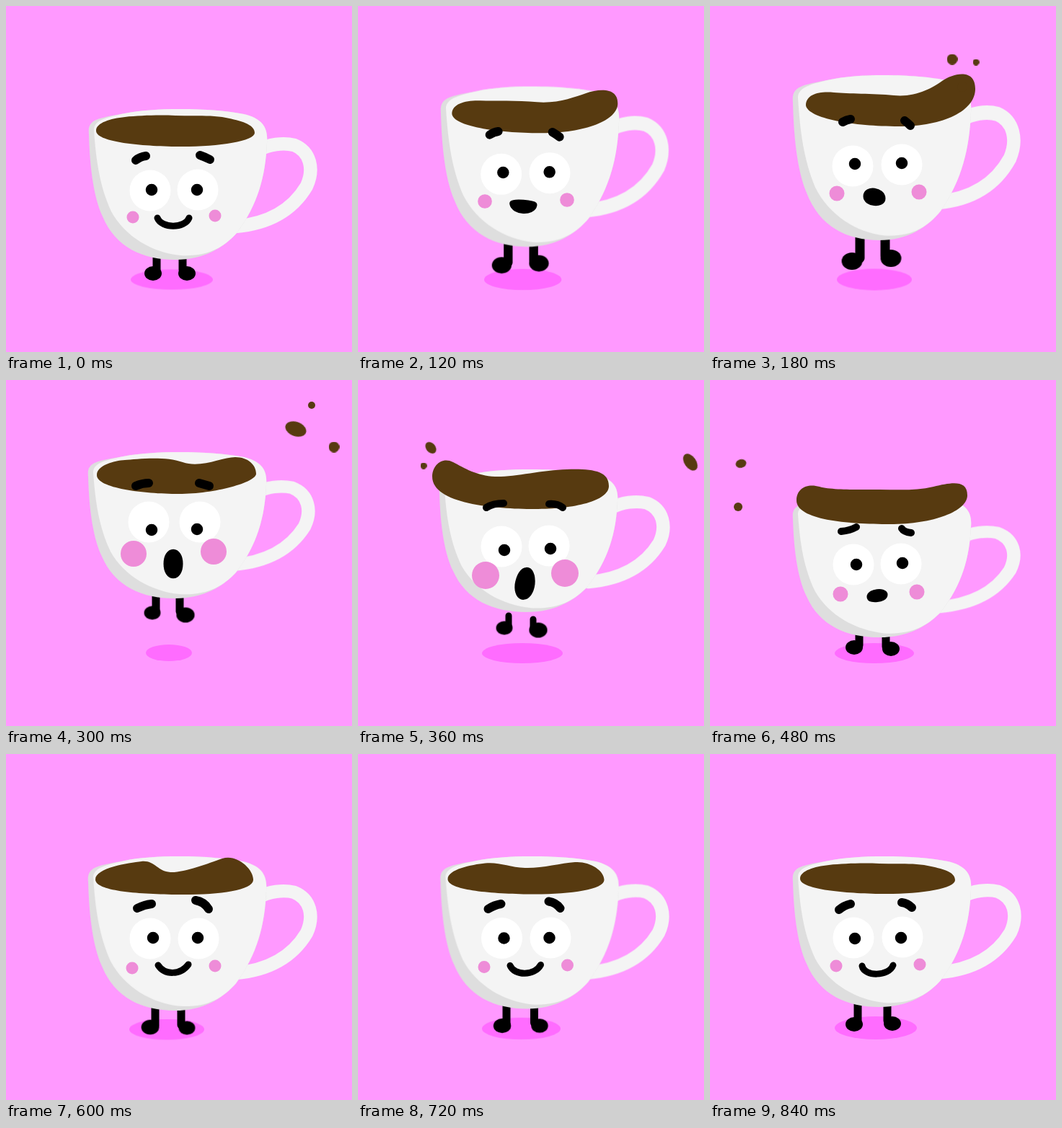
An HTML page without scripts for the animation above (900 ms loop, 480 px wide and 480 px high).

```html
<!DOCTYPE html>
<html lang="en">
<head>
<meta charset="utf-8">
<title>Jumping coffee cup</title>
<style>
html, body { margin: 0; width: 100%; height: 100%; overflow: hidden; background: #ff99ff; }
svg { display: block; width: 100vw; height: 100vh; }

/* Drawn at 15 poses per loop: each segment steps once every 60 ms. */
.morph, .move, .right, .left { animation: 900ms -1ms infinite step-end; }
.morph { animation-name: morph; }
.move { animation-name: move; }
.right { animation-name: right; }
.left { animation-name: left; }

@keyframes morph {
  0% { d: var(--rest); stroke-width: var(--w-rest, var(--w)); animation-timing-function: steps(3); }
  20% { d: var(--rise); stroke-width: var(--w-rise, var(--w)); animation-timing-function: steps(2); }
  33.33% { d: var(--apex); stroke-width: var(--w-apex, var(--w)); }
  40% { d: var(--fall); stroke-width: var(--w-fall, var(--w)); animation-timing-function: steps(2); }
  53.33% { d: var(--land); stroke-width: var(--w-land, var(--w)); animation-timing-function: steps(2); }
  66.66% { d: var(--recoil); stroke-width: var(--w-rest, var(--w)); animation-timing-function: steps(4); }
  93.33% { d: var(--settle); stroke-width: var(--w-rest, var(--w)); }
  100% { d: var(--rest); stroke-width: var(--w-rest, var(--w)); }
}
@keyframes move {
  0% { transform: var(--rest); animation-timing-function: steps(3); }
  20% { transform: var(--rise); animation-timing-function: steps(2); }
  33.33% { transform: var(--apex); }
  40% { transform: var(--fall); animation-timing-function: steps(2); }
  53.33% { transform: var(--land); animation-timing-function: steps(2); }
  66.66% { transform: var(--recoil); animation-timing-function: steps(4); }
  93.33% { transform: var(--settle); }
  100% { transform: var(--rest); }
}
@keyframes right {
  0% { opacity: 0; }
  20% { opacity: 1; transform: var(--rise); animation-timing-function: steps(2); }
  33.33% { opacity: 1; transform: var(--apex); }
  40% { opacity: var(--stay, 0); transform: var(--fall, var(--apex)); }
  46.66%, 100% { opacity: 0; }
}
@keyframes left {
  0% { opacity: 0; }
  40% { opacity: 1; transform: var(--fall); animation-timing-function: steps(2); }
  53.33% { opacity: 1; transform: var(--land); }
  60% { opacity: 1; transform: var(--gone); }
  66.66%, 100% { opacity: 0; }
}

.line { fill: none; stroke-linecap: round; stroke-linejoin: round; }
.ink { stroke: #000; }
.coffee { fill: #573a10; }

#shadow {
  --rest: translate(230px, 379.5px) scale(57, 14);
  --rise: translate(228px, 379.5px) scale(52, 15);
  --apex: translate(226px, 378.5px) scale(32, 11.5);
  --fall: translate(228px, 379px) scale(56, 14);
  --land: translate(228px, 379px) scale(55, 14);
  --recoil: translate(223px, 382px) scale(52, 14.5);
  --settle: translate(230px, 380px) scale(57, 16);
}
#handle {
  --rest: translate(0, 0) scaleY(1);
  --rise: translate(-1px, -59.2px) scaleY(1.083);
  --apex: translate(-3px, -33.3px) scaleY(.947);
  --fall: translate(1px, -16.5px) scaleY(.97);
  --land: translate(-1px, 36.5px) scaleY(.91);
  --recoil: translate(0, .4px) scaleY(.992);
  --settle: translate(0, -.6px) scaleY(.992);
}
#body {
  --rest: translate(0, 0) scaleY(1);
  --rise: translate(0, -60.8px) scaleY(1.096);
  --apex: translate(-1px, -38.8px) scaleY(.971);
  --fall: translate(-2px, -11.4px) scaleY(.947);
  --land: translate(0, 23.4px) scaleY(.948);
  --recoil: translate(-1px, -4.5px) scaleY(1.024);
  --settle: translate(0, -1px) scaleY(1);
}
#legs {
  --w-rest: 11px; --w-rise: 13px; --w-apex: 11px; --w-fall: 9px; --w-land: 11px;
  --rest: path("M209 340V368M245 340V366");
  --rise: path("M208 310V350M243 310V346");
  --apex: path("M208 290V320M241 290V321");
  --fall: path("M209 327V342M243 332V344");
  --land: path("M207 345V368M244 345V370");
  --recoil: path("M207 340V376M243 342V376");
  --settle: path("M205 340V372M246 340V370");
}
#foot-l {
  --rest: translate(204px, 371px) scale(1);
  --rise: translate(197px, 354px) scale(1.2);
  --apex: translate(203px, 323px) scale(.95);
  --fall: translate(203px, 344px) scale(.95);
  --land: translate(200px, 371px) scale(1);
  --recoil: translate(200px, 379px) scale(1.03);
  --settle: translate(200px, 375px) scale(1);
}
#foot-r {
  --rest: translate(251px, 371px) scale(1);
  --rise: translate(251px, 350px) scale(1.2);
  --apex: translate(249px, 326px) scale(1.05);
  --fall: translate(250px, 347px) scale(1.05);
  --land: translate(251px, 373px) scale(1);
  --recoil: translate(251px, 380px) scale(.95);
  --settle: translate(253px, 374px) scale(1);
}
#coffee {
  --rest: path("M125 173C125 162 145 156 165 154S210 151 235 152S285 151 305 155S345 164 345 176S290 196 235 195S125 188 125 173Z");
  --rise: path("M133 138C133 122 152 118 172 120S225 121 255 124S308 114 322 104S368 85 368 115S325 167 262 167S136 156 133 138Z");
  --apex: path("M126 132C126 118 150 112 165 111S220 105 245 114S300 107 318 107S347 118 347 130S290 158 240 158S126 150 126 132Z");
  --fall: path("M103 134C103 118 117 106 132 114S165 133 190 134S255 125 290 124S348 126 348 147S300 179 245 179S103 172 103 134Z");
  --land: path("M120 167C120 150 135 143 152 148S210 152 235 152S285 154 310 148S357 138 357 160S310 200 250 200S120 194 120 167Z");
  --recoil: path("M124 174C124 158 170 151 188 149S210 163 228 164S280 152 300 145S344 160 343 175S290 196 235 195S124 190 124 174Z");
  --settle: path("M125 173C125 162 145 156 165 154S210 151 235 152S282 151 302 155S340 163 340 175S290 195 235 194S125 187 125 173Z");
}
#eyes {
  --w: 57px;
  --rest: path("M200 256h.01M266 255h.01");
  --rise: path("M198 222h.01M266 220h.01");
  --apex: path("M198 197h.01M269 197h.01");
  --fall: path("M199 231h.01M265 230h.01");
  --land: path("M199 256h.01M265 255h.01");
  --recoil: path("M200 256h.01M267 256h.01");
  --settle: path("M199 255h.01M267 254h.01");
}
#pupils {
  --w: 16.5px;
  --rest: path("M202 255h.01M265 255h.01");
  --rise: path("M201 219h.01M266 218h.01");
  --apex: path("M202 208h.01M265 207h.01");
  --fall: path("M203 236h.01M267 234h.01");
  --land: path("M203 256h.01M267 254h.01");
  --recoil: path("M204 255h.01M266 255h.01");
  --settle: path("M201 256h.01M265 255h.01");
}
#cheeks {
  --w-rest: 17px; --w-rise: 21px; --w-apex: 36px; --w-fall: 38px; --w-land: 21px;
  --rest: path("M176 293h.01M290 291h.01");
  --rise: path("M176 260h.01M290 258h.01");
  --apex: path("M177 241h.01M288 238h.01");
  --fall: path("M177 271h.01M287 268h.01");
  --land: path("M181 297h.01M287 294h.01");
  --recoil: path("M175 297h.01M290 294h.01");
  --settle: path("M175 294h.01M291 292h.01");
}
#brows {
  --w-rest: 12px; --w-rise: 12px; --w-apex: 12px; --w-fall: 10px; --w-land: 10px;
  --rest: path("M180 214Q186 209 194 208M269 207Q275 209 283 213");
  --rise: path("M184 161Q189 158 195 157M270 159Q274 162 278 166");
  --apex: path("M180 147Q189 143 198 143M268 143Q275 145 282 147");
  --fall: path("M178 177Q187 171 202 171M265 172Q276 171 284 177");
  --land: path("M182 210Q194 209 203 204M266 206Q269 211 279 212");
  --recoil: path("M182 214Q192 209 202 208M263 203Q275 205 281 215");
  --settle: path("M179 216Q186 210 195 208M266 206Q274 207 280 213");
}
#mouth {
  --w: 9px;
  --rest: path("M210 294C216 309 248 309 254 294C248 309 216 309 210 294Z");
  --rise: path("M217 264C217 274 239 276 239 267C239 256 217 253 217 264Z");
  --apex: path("M223 255C223 276 241 276 241 255C241 234 223 234 223 255Z");
  --fall: path("M222 284C220 306 238 306 241 283C243 258 226 258 222 284Z");
  --land: path("M222 301C222 306 242 304 242 298C242 292 222 294 222 301Z");
  --recoil: path("M211 293C220 307 242 307 253 292C242 307 220 307 211 293Z");
  --settle: path("M211 294C214 309 248 309 254 293C248 309 214 309 211 294Z");
}
#blob {
  --stay: 1;
  --rise: translate(336px, 74px) rotate(0deg) scale(7.5, 7.5);
  --apex: translate(402px, 68px) rotate(20deg) scale(15, 10);
  --fall: translate(461px, 114px) rotate(55deg) scale(13, 8);
}
#bead {
  --rise: translate(369px, 78px) scale(4.5);
  --apex: translate(424px, 35px) scale(5);
}
#straggler {
  --rise: translate(350px, 112px) scale(7);
  --apex: translate(455px, 93px) scale(7.5);
}
#splash-a {
  --fall: translate(101px, 94px) rotate(50deg) scale(9, 6.5);
  --land: translate(43px, 116px) rotate(-15deg) scale(7.5, 6);
  --gone: translate(12px, 139px) rotate(0deg) scale(6, 6);
}
#splash-b {
  --fall: translate(91px, 119px) scale(4.5);
  --land: translate(39px, 176px) scale(6);
  --gone: translate(12px, 212px) scale(5);
}
</style>
</head>
<body>
<svg viewBox="0 0 480 480">
  <rect width="480" height="480" fill="#ff99ff"/>
  <circle id="shadow" class="move" r="1" fill="#ff6cff"/>
  <path id="handle" class="move line" stroke="#f4f4f4" stroke-width="18.5"
    d="M350 200C365 192 384 189 400 193C422 202 428 226 417 250C398 282 365 302 318 306"/>

  <path id="legs" class="morph line ink"/>
  <ellipse id="foot-l" class="move" rx="12" ry="10"/>
  <ellipse id="foot-r" class="move" rx="12" ry="10"/>

  <g id="body" class="move">
    <path fill="#dedede" d="M115 178C113 158 124 156 165 149C210 140 290 142 330 150C355 156 364 168 362 190C360 235 350 275 320 315C302 335 275 352 235 352C190 352 152 335 134 292C120 262 116 215 115 178Z"/>
    <path fill="#f4f4f4" d="M122 172C122 160 135 155 165 149C210 140 290 142 330 150C355 156 364 168 362 190C360 235 350 275 320 315C302 335 280 348 242 346C203 342 165 320 146 285C130 250 125 215 122 172Z"/>
  </g>
  <path id="coffee" class="morph coffee"/>

  <path id="eyes" class="morph line" stroke="#fff"/>
  <path id="pupils" class="morph line ink"/>
  <path id="cheeks" class="morph line" stroke="#ee8cd8"/>
  <path id="brows" class="morph line ink"/>
  <path id="mouth" class="morph ink" stroke-linejoin="round"/>

  <g class="coffee">
    <circle id="blob" class="right" r="1"/>
    <circle id="bead" class="right" r="1"/>
    <circle id="straggler" class="right" r="1"/>
    <circle id="splash-a" class="left" r="1"/>
    <circle id="splash-b" class="left" r="1"/>
  </g>
</svg>
</body>
</html>
```
